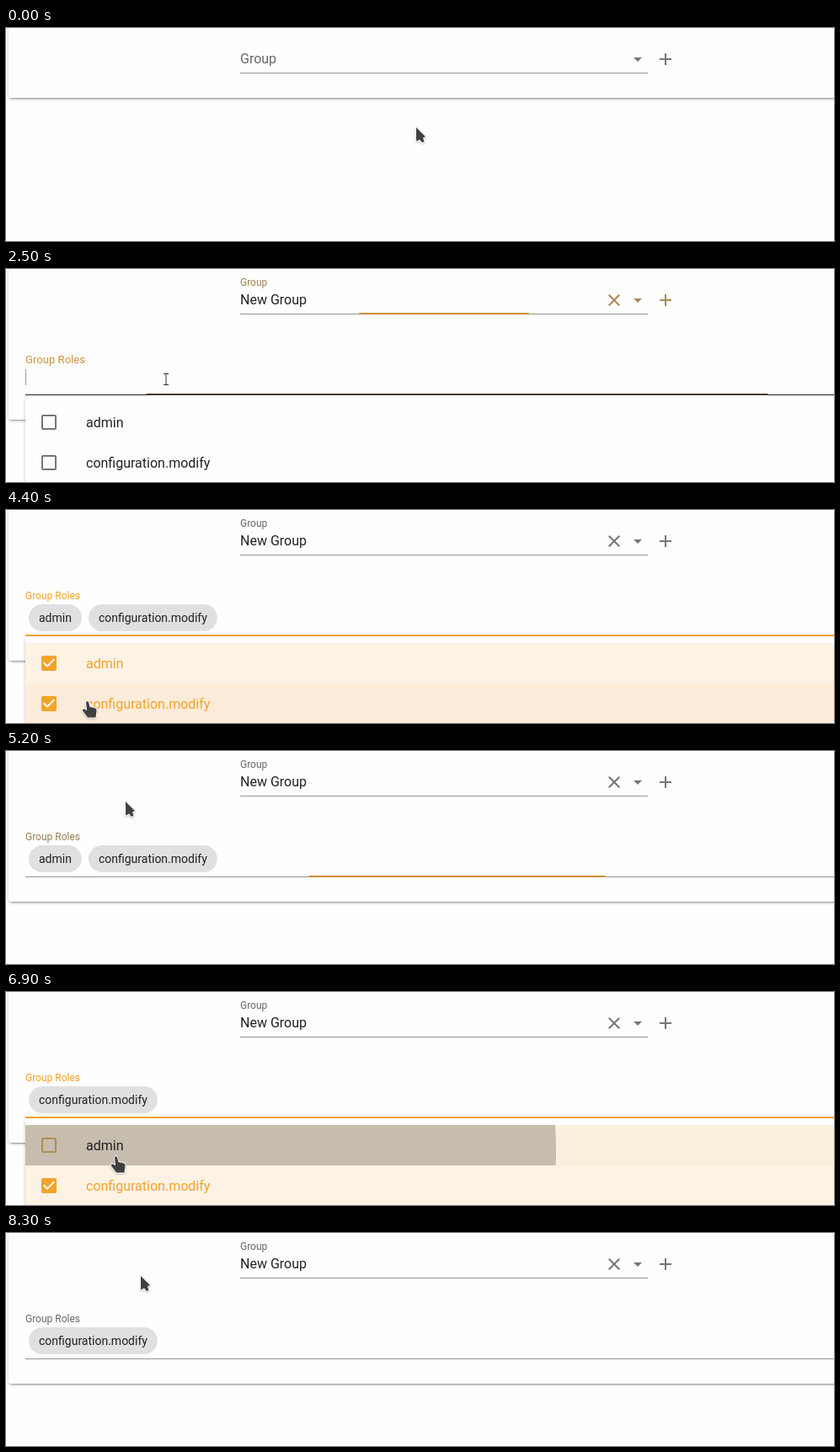
Recreate the animation shown at these times as an HTML page with a canvas. Size 983x253 px, loop 8800 ms.

```html
<!DOCTYPE html>
<html lang="en">
<head>
<meta charset="utf-8">
<title>Group roles</title>
<style>
  html, body { margin: 0; width: 100%; height: 100%; overflow: hidden; background: #fefefe; }
  canvas { display: block; }
</style>
</head>
<body>
<canvas id="stage" width="983" height="253"></canvas>
<script>
const ctx = document.getElementById('stage').getContext('2d');
const LOOP = 8800, STEP = 100;

const ORANGE = [243, 163, 41], GREY = [117, 117, 117], LABEL = [102, 102, 102], INK = [33, 33, 33];
const PAPER = '#fefefe';

const icons = {
  close: new Path2D('M19 6.41L17.59 5L12 10.59L6.41 5L5 6.41L10.59 12L5 17.59L6.41 19L12 13.41L17.59 19L19 17.59L13.41 12Z'),
  down: new Path2D('M7 10L12 15L17 10Z'),
  plus: new Path2D('M19 13H13V19H11V13H5V11H11V5H13V11H19Z'),
  tick: new Path2D('M10 17L5 12L6.41 10.58L10 14.17L17.59 6.58L19 8Z')
};

const pointers = {
  arrow: new Path2D('M0 0V16.5L4 14.5L7 18L9.5 17L8 12.5L11 11Z'),
  hand: new Path2D('M-1 1.5Q0 -.8 2 1L3.5 7L9 8Q12 9 11.5 12L10.5 19.5H1L-5 11.5Q-6 9 -3 9.5L0 11Z')
};

// time, x, y, pointer shape
const track = [
  [0, 487, 118, 'arrow'], [200, 487, 118, 'arrow'], [500, 470, 37, 'beam'],
  [1400, 470, 37, 'beam'], [1600, 440, 78, 'hand'], [1800, 430, 84, 'hand'],
  [2100, 190, 131, 'beam'], [2500, 190, 131, 'beam'], [2800, 130, 160, 'hand'],
  [3000, 98, 172, 'hand'], [3400, 98, 172, 'hand'], [3800, 96, 227, 'hand'],
  [4400, 96, 227, 'hand'], [4700, 128, 100, 'arrow'], [4900, 142, 60, 'arrow'],
  [5300, 142, 60, 'arrow'], [5600, 170, 122, 'beam'], [5800, 190, 131, 'beam'],
  [6100, 190, 131, 'beam'], [6300, 150, 166, 'hand'], [6500, 130, 195, 'hand'],
  [7100, 130, 195, 'hand'], [7300, 145, 120, 'arrow'], [7600, 160, 51, 'arrow'],
  [LOOP, 160, 51, 'arrow']
];

const clamp = v => Math.max(0, Math.min(1, v));
const lerp = (a, b, p) => a + (b - a) * p;
const mix = (a, b, p) => `rgb(${a.map((v, i) => Math.round(lerp(v, b[i], p)))})`;
const within = (t, a, b) => t >= a && t < b;

// cubic-bezier(.25, .8, .5, 1)
function ease(p) {
  p = clamp(p);
  let lo = 0, hi = 1;
  for (let i = 0; i < 20; i++) {
    const s = (lo + hi) / 2, r = 1 - s;
    if (.75 * s * r * r + 1.5 * s * s * r + s ** 3 < p) lo = s; else hi = s;
  }
  const r = 1 - lo;
  return 2.4 * lo * r * r + 3 * lo * lo * r + lo ** 3;
}

const since = (t, start) => ease((t - start) / 300);
const pulse = (t, on, off) => t < off ? since(t, on) : 1 - since(t, off);

function rect(x, y, w, h, color) {
  ctx.fillStyle = color;
  ctx.fillRect(x, y, w, h);
}

function rounded(x, y, w, h, r, color) {
  ctx.fillStyle = color;
  ctx.beginPath();
  ctx.roundRect(x, y, w, h, r);
  ctx.fill();
}

function text(str, x, y, size, color) {
  ctx.font = `${size}px Roboto, sans-serif`;
  ctx.fillStyle = color;
  ctx.fillText(str, x, y);
}

function icon(path, cx, cy, color) {
  ctx.save();
  ctx.translate(cx - 12, cy - 12);
  ctx.fillStyle = color;
  ctx.fill(path);
  ctx.restore();
}

// shadows: [offset y, blur, spread, alpha]
function panel(x, y, w, h, shadows) {
  for (const [dy, blur, spread, alpha] of shadows) {
    ctx.save();
    ctx.shadowColor = `rgba(0,0,0,${alpha})`;
    ctx.shadowBlur = blur;
    ctx.shadowOffsetY = dy;
    rounded(x - spread, y - spread, w + 2 * spread, h + 2 * spread, 4, PAPER);
    ctx.restore();
  }
  rounded(x, y, w, h, 4, PAPER);
}

const menuPanel = (x, y, w, h) => panel(x, y, w, h, [[2, 4, 0, .22]]);

function underline(x, y, w, hover, focus, leaving) {
  rect(x, y, w, 1, hover ? '#212121' : '#949494');
  if (focus < .01) return;
  const tint = mix(INK, ORANGE, focus ** (leaving ? .2 : 5));
  rect(x + w * (1 - focus) / 2, y - 1, w * focus, 2, tint);
}

function caret(x, y) {
  rect(x, y, 1, 19, '#9a9a9a');
}

function fieldLabel(str, x, base, float, focus) {
  text(str, x, base - 22 * float, 16 - 4 * float, mix(LABEL, ORANGE, focus));
}

function groupField(t) {
  const focus = pulse(t, 680, 2428);
  const tint = mix(GREY, ORANGE, focus);
  underline(278, 53, 484, within(t, 500, 1600), focus, t >= 2428);
  fieldLabel('Group', 278, 42, since(t, 680), focus);
  if (t >= 1800) {
    text('New Group', 278, 42, 16, mix(INK, INK, 0));
    icon(icons.close, 722, 37, tint);
  }
  icon(icons.down, 750, 37, tint);
  icon(icons.plus, 783, 37, tint);
  if (within(t, 700, 1300)) caret(278, 28);
}

function groupMenu(t) {
  menuPanel(278, 54, 484, 64);
  if (t >= 1600) rect(278, 62, 484, 48, '#f5f5f5');
  text('New Group', 294, 92, 16, '#212121');
}

function chip(str, x) {
  ctx.font = '14px Roboto, sans-serif';
  const w = ctx.measureText(str).width + 24;
  rounded(x, 112, w, 32, 16, '#e0e0e0');
  text(str, x + 12, 133, 14, '#212121');
  return x + w + 8;
}

function rolesField(t) {
  const again = t >= 6000;
  const focus = again ? pulse(t, 6050, 7960) : pulse(t, 2400, 5114);
  const leaving = again ? t >= 7960 : t >= 5114;
  const hover = within(t, 2100, 2700) || within(t, 5600, 6300);
  underline(23, 149, 1025, hover, focus, leaving);
  fieldLabel('Group Roles', 23, 128, since(t, 2400), focus);
  let x = 27;
  if (within(t, 3300, 6900)) x = chip('admin', x);
  if (t >= 4100) chip('configuration.modify', x);
  if (within(t, 2400, 3000)) caret(23, 119);
  if (within(t, 6100, 6700)) caret(255, 119);
  if (within(t, 7200, 7800)) caret(184, 119);
}

function checkbox(y, checked, amount) {
  const color = mix(GREY, ORANGE, amount);
  if (checked) {
    rounded(42, y - 9, 18, 18, 2, color);
    icon(icons.tick, 51, y, PAPER);
  } else {
    ctx.strokeStyle = color;
    ctx.lineWidth = 2;
    ctx.beginPath();
    ctx.roundRect(43, y - 8, 16, 16, 1);
    ctx.stroke();
  }
}

function row(str, top, checked, amount, hover, ripple) {
  const bg = checked ? (hover ? '#fdecd9' : '#fdf2e4') : (hover ? '#f5f5f5' : PAPER);
  rect(23, top, 1025, 48, bg);
  if (ripple) ripple(top);
  checkbox(top + 24, checked, amount);
  text(str, 95, top + 30, 16, checked ? mix(ORANGE, ORANGE, 0) : '#212121');
}

function glow(alpha) {
  return top => rect(23, top, 1025, 48, `rgba(240,211,163,${alpha})`);
}

function wave(t) {
  return top => {
    rect(23, top, 1025, 48, `rgba(253,238,215,${clamp((7100 - t) / 250)})`);
    ctx.save();
    ctx.beginPath();
    ctx.rect(23, top, 1025, 48);
    ctx.clip();
    ctx.fillStyle = `rgba(30,30,30,${.24 * clamp((7300 - t) / 400)})`;
    ctx.beginPath();
    ctx.arc(129, top + 32, 524 + (t - 6900) * 4.5, 0, 7);
    ctx.fill();
    ctx.restore();
  };
}

function rolesMenu(t) {
  menuPanel(23, 150, 1025, 320);
  let ripple = null;
  if (within(t, 3200, 3700)) ripple = glow(.75 * clamp(t < 3300 ? .5 : (3700 - t) / 400));
  if (within(t, 6900, 7300)) ripple = wave(t);
  row('admin', 158, within(t, 3300, 6900), pulse(t, 3230, 6840),
    within(t, 2900, 3600) || within(t, 6400, 7200), ripple);
  row('configuration.modify', 206, t >= 4100, since(t, 4030),
    within(t, 4100, 4600), within(t, 4100, 4400) ? glow(.75 * (4400 - t) / 300) : null);
}

function pointer(t) {
  const i = track.findIndex((k, n) => n === track.length - 1 || t < track[n + 1][0]);
  const a = track[i], b = track[Math.min(i + 1, track.length - 1)];
  const p = b[0] > a[0] ? (t - a[0]) / (b[0] - a[0]) : 0;
  ctx.save();
  ctx.translate(lerp(a[1], b[1], p), lerp(a[2], b[2], p));
  if (a[3] === 'beam') {
    rect(-4, -8, 8, 16, 'rgba(255,255,255,.7)');
    rect(-.5, -6, 1, 12, '#333');
    rect(-3, -7, 6, 1, '#333');
    rect(-3, 6, 6, 1, '#333');
  } else {
    ctx.shadowColor = 'rgba(0,0,0,.25)';
    ctx.shadowBlur = 2;
    ctx.shadowOffsetY = 1;
    ctx.lineJoin = 'round';
    ctx.lineWidth = 2;
    ctx.strokeStyle = '#fff';
    ctx.stroke(pointers[a[3]]);
    ctx.shadowColor = 'transparent';
    ctx.fillStyle = '#404040';
    ctx.fill(pointers[a[3]]);
  }
  ctx.restore();
}

function draw(t) {
  rect(0, 0, 983, 253, PAPER);
  panel(3, -20, 1065, t < 1900 ? 103 : 199, [[3, 1, -2, .2], [2, 2, 0, .14], [1, 5, 0, .12]]);
  groupField(t);
  if (t >= 1900) rolesField(t);
  if (within(t, 800, 1800)) groupMenu(t);
  if (within(t, 2500, 5200) || within(t, 6200, 8000)) rolesMenu(t);
  pointer(t);
}

const start = performance.now();
function frame() {
  const t = (performance.now() - start) % LOOP;
  draw(Math.floor(t / STEP) * STEP);
  requestAnimationFrame(frame);
}
frame();
</script>
</body>
</html>
```
